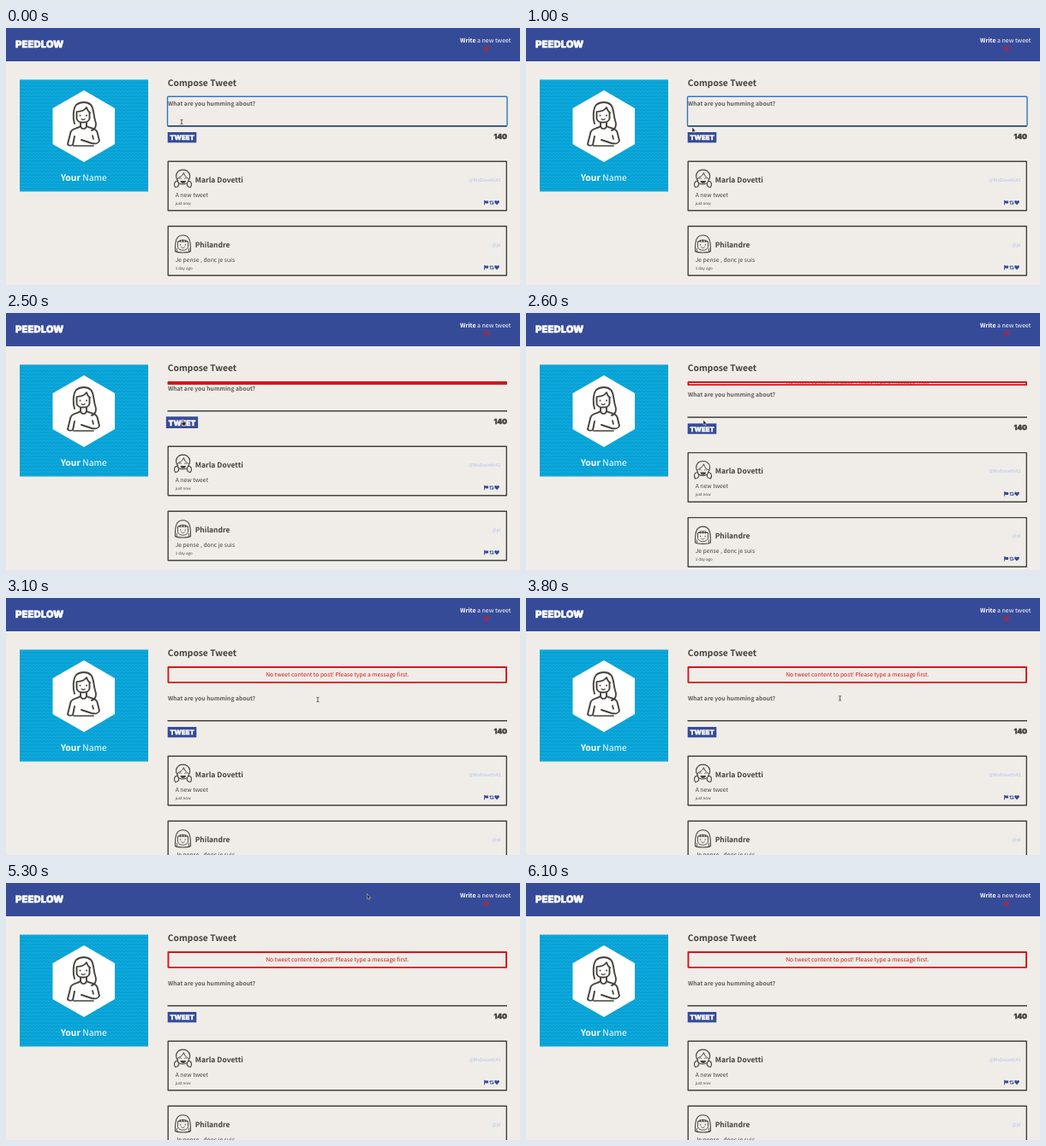
These frames come from a looping animation (600x301 px, 6.2 s). An HTML page with a canvas:

```html
<!DOCTYPE html>
<html lang="en">
<head>
<meta charset="utf-8">
<title>Compose</title>
<style>
html, body { margin: 0; width: 100%; height: 100%; overflow: hidden; background: #f0ede8; }
canvas { display: block; width: 600px; height: 301px; }
</style>
</head>
<body>
<canvas id="stage"></canvas>
<script>
const W = 600, H = 301, LOOP = 6200;
const BLUE = '#364b98', PAPER = '#f0ede8', INK = '#45423d', RED = '#d5161b', PALE = '#b2c3ee';
const SANS = '"Noto Sans CJK JP", "Noto Sans CJK SC", "Noto Sans", sans-serif';
const BLOCK = 'Inter, Roboto, sans-serif';

const canvas = document.getElementById('stage');
const ctx = canvas.getContext('2d');
const ratio = window.devicePixelRatio || 1;
canvas.width = W * ratio;
canvas.height = H * ratio;

function text(str, x, y, size, { weight = 400, color = INK, align = 'left', family = SANS } = {}) {
  ctx.font = `${weight} ${size}px ${family}`;
  ctx.textAlign = align;
  ctx.fillStyle = color;
  ctx.fillText(str, x, y);
  return ctx.measureText(str).width;
}

function blockText(str, x, y, size, color, align) {
  text(str, x, y, size, { weight: 900, color, align, family: BLOCK });
  ctx.strokeStyle = color;
  ctx.lineWidth = size * 0.045;
  ctx.strokeText(str, x, y);
}

function rect(x, y, w, h, color) {
  ctx.fillStyle = color;
  ctx.fillRect(x, y, w, h);
}

function frame(x, y, w, h, color, width) {
  ctx.strokeStyle = color;
  ctx.lineWidth = width;
  ctx.strokeRect(x + width / 2, y + width / 2, w - width, h - width);
}

function line(d, width, color = INK, fill) {
  const path = new Path2D(d);
  if (fill) { ctx.fillStyle = fill; ctx.fill(path); }
  ctx.strokeStyle = color;
  ctx.lineWidth = width;
  ctx.lineCap = ctx.lineJoin = 'round';
  ctx.stroke(path);
}

function shape(d, color) {
  ctx.fillStyle = color;
  ctx.fill(new Path2D(d));
}

function dot(x, y, r, color = INK) {
  ctx.fillStyle = color;
  ctx.beginPath();
  ctx.arc(x, y, r, 0, Math.PI * 2);
  ctx.fill();
}

function at(x, y, draw, scale = 1) {
  ctx.save();
  ctx.translate(x, y);
  ctx.scale(scale, scale);
  draw();
  ctx.restore();
}

function header() {
  rect(0, 0, W, 39, BLUE);
  blockText('PEEDLOW', 11, 23, 11.4, '#fff', 'left');
  const w = text('a new tweet', 589.5, 16.6, 7, { weight: 300, color: '#fff', align: 'right' });
  text('Write ', 589.5 - w, 16.6, 7, { weight: 700, color: '#fff', align: 'right' });
  line('M558 21.5l2.7 2.6 2.7-2.6M558 24.3l2.7 2.6 2.7-2.6', 1.1, '#d01b2b');
}

function woman() {
  line('M80 112C78 106 78 95 82 90C87 86 95 86 99 90C103 94 102 103 104 108C106 113 105 118 100 120', 1.9);
  line('M82.5 99V106C83 112 97 112 97.5 106V99', 1.9);
  line('M82.5 98C88 98 92 96 94 93C95 96 96 98 98 99', 1.7);
  line('M87 111V115C84 118 77 117 75.5 122L72 136C73 138 76 138 78 137L80 127', 1.9);
  line('M94 111V115C99 118 105 117 106.5 122L109 132C108 135 104 136 100 135L88 131', 1.9);
  line('M87 115C88 119 93 119 94 115M79 138H102M101 126L102 130', 1.7);
  dot(86.5, 102.5, 1);
  dot(94, 102.5, 1);
  line('M88 106.5C89.5 107.6 91 107.6 92.3 106.5', 1.1);
}

function profile() {
  rect(16, 60.5, 150, 131, '#06a2d6');
  ctx.save();
  ctx.beginPath();
  ctx.rect(16, 60.5, 150, 131);
  ctx.clip();
  ctx.beginPath();
  for (let y = 62; y < 194; y += 4) {
    for (let x = 16; x <= 168; x += 2) ctx.lineTo(x, y + (x % 4 ? 1 : -1));
    ctx.moveTo(16, y + 4);
  }
  ctx.strokeStyle = 'rgba(90,205,235,.26)';
  ctx.lineWidth = 0.8;
  ctx.stroke();
  ctx.restore();
  shape('M91 73L127 94V136L91 157L54.5 136V94Z', '#fff');
  woman();
  const w = text('Your ', 64, 179, 10.3, { weight: 700, color: '#fff' });
  text('Name', 64 + w, 179, 10.3, { weight: 300, color: '#fff' });
}

function girl() {
  line('M-6 2C-7 8 6 8 6.5 2C9 -1 9 -6 5 -9C2 -11 -4 -11 -6 -8C-9 -5 -8 0 -6 2Z', 1.1);
  line('M-6.5 0C-4 -2 0 -3 1 -7C2 -3 4 -1 6.8 0', 1);
  line('M-6 3C-10 2 -11 7 -9 10C-6 10 -4 8 -5 5M6 3C10 2 11 7 9 10C6 10 4 8 5 5', 1.1);
  shape('M-3 2.5H3.5C3.5 6.5 -3 6.5 -3 2.5Z', INK);
  line('M-4 0l1-.8 1 .8M2 0l1-.8 1 .8', 0.8);
}

function bob() {
  line('M-9 9C-9 3 -9 -3 -7 -6C-4 -11 4 -11 7 -6C9 -3 9 3 9 9C6 11 -6 11 -9 9Z', 1.1);
  line('M-6 -2V4C-5 9 5 9 6 4V-2ZM-6 -2C-4 -5 4 -5 6 -2M-3 -2V-4M0 -2V-4.3M3 -2V-4', 0.9);
  dot(-2.8, 1.5, 0.7);
  dot(2.8, 1.5, 0.7);
  line('M-2 4C-1 5.5 1 5.5 2 4', 0.8);
  line('M-7 6V9M7 6V9', 0.8);
}

function actions(y) {
  at(558, y, () => {
    line('M.5 -2.3V2.4', 0.9, BLUE);
    shape('M.8 -2.2C2 -2.8 3 -1.4 5 -2.2V.8C3 1.6 2.2 .2 .8 1Z', BLUE);
    line('M7.4 -1.7V1.7H9.2M6.4 -.7l1-1.1 1 1.1M8.6 -1.7H10.4V1.7M9.4 .7l1 1.1 1-1.1', 0.75, BLUE);
    shape('M15 2.7L12.4 0C11.2 -1.7 13.8 -3.5 15 -1.5C16.2 -3.5 18.8 -1.7 17.6 0Z', BLUE);
  });
}

function card(y, avatar, name, handle, message, age) {
  frame(188.5, y, 396.5, 59, INK, 1.4);
  at(206.5, y + 21, avatar);
  text(name, 220.7, y + 25, 8.5, { weight: 700 });
  text(handle, 577.5, y + 24, 5.55, { color: PALE, align: 'right' });
  text(message, 197.7, y + 42.3, 6.75, { weight: 300 });
  text(age, 197.7, y + 51, 4.55);
  actions(y + 49);
}

function errorBox(k) {
  if (!k) return;
  ctx.save();
  ctx.beginPath();
  ctx.rect(188, 80, 398, 20 * k);
  ctx.clip();
  text('No tweet content to post! Please type a message first.', 386.8, 80 + 12.4 * k, 6.75,
    { weight: 300, color: RED, align: 'center' });
  ctx.restore();
  frame(188.5, 80, 396.5, Math.max(4, 19.8 * k), RED, 1.9);
}

function composer(shift, focused, hovered) {
  text('What are you humming about?', 189, 91 + shift, 6.8, { weight: 700, color: '#5e5a54' });
  rect(188.5, 114 + shift, 396.5, 1.5, INK);
  if (focused) {
    ctx.strokeStyle = '#3575c6';
    ctx.lineWidth = 1.4;
    ctx.beginPath();
    ctx.roundRect(188.5, 80.3, 396.5, 34.5, 1.2);
    ctx.stroke();
    rect(189.5, 114, 394.5, 1.4, '#34496f');
  }
  at(205.5, 128.2 + shift, () => {
    rect(-16.8, -6.2, 33.6, 12.3, BLUE);
    blockText('TWEET', 0, 3, 7.8, '#fff', 'center');
  }, hovered ? 1.11 : 1);
  blockText('140', 585, 129.6 + shift, 8.4, INK, 'right');
}

const pointers = {
  beam: () => line('M-1.2 -2.8Q0 -2.8 0 -1.8V1.8Q0 2.8 -1.2 2.8M1.2 -2.8Q0 -2.8 0 -1.8M0 1.8Q0 2.8 1.2 2.8', 0.8, '#444'),
  arrow: () => line('M0 -2.5V3.2L1.3 2L2.2 4L3.1 3.6L2.2 1.7H4Z', 0.5, '#ddd', '#222'),
  hand: () => line('M-.8 -3V1L-2.2 0L-2.4 1L-.6 3.8H2.4L3 .2L.5 -.4V-3Q-.2 -3.8 -.8 -3Z', 0.5, '#ddd', '#222')
};

// Pointer stops: time, x, y
const route = [
  [0, 205, 110], [400, 204, 111], [1000, 194, 119], [1600, 207, 128], [2700, 207, 128],
  [3100, 364, 119], [3700, 364, 119], [4400, 414, 87], [4900, 414, 87], [5500, 424, -8], [LOOP, 424, -8]
];

function pointerAt(t) {
  const i = route.findIndex(stop => stop[0] > t);
  const [t0, x0, y0] = route[i - 1], [t1, x1, y1] = route[i];
  const k = swing((t - t0) / (t1 - t0));
  return [x0 + (x1 - x0) * k, y0 + (y1 - y0) * k];
}

function swing(p) {
  const k = Math.min(1, Math.max(0, p));
  return 0.5 - Math.cos(Math.PI * k) / 2;
}

function render(t) {
  ctx.setTransform(ratio, 0, 0, ratio, 0, 0);
  ctx.textRendering = 'geometricPrecision';
  rect(0, 0, W, H, PAPER);

  const open = swing((t - 2500) / 300);
  const shift = 29 * open;
  const [x, y] = pointerAt(t);
  const onButton = Math.abs(x - 205.5) < 17 && Math.abs(y - 128.2 - shift) < 6.5;
  const inField = x > 188 && y > 80 && y < 115 + shift;

  header();
  profile();
  text('Compose Tweet', 188.8, 68, 10.25, { weight: 700 });
  errorBox(open);
  composer(shift, t < 2300, onButton);
  card(155.5 + shift, girl, 'Marla Dovetti', '@MsDovetti42', 'A new tweet', 'just now');
  card(231.5 + shift, bob, 'Philandre', '@pl', 'Je pense , donc je suis', '1 day ago');
  at(x, y, pointers[onButton ? 'hand' : inField ? 'beam' : 'arrow']);
}

const start = performance.now();
function tick() {
  render((performance.now() - start) % LOOP);
  requestAnimationFrame(tick);
}
tick();
</script>
</body>
</html>
```
